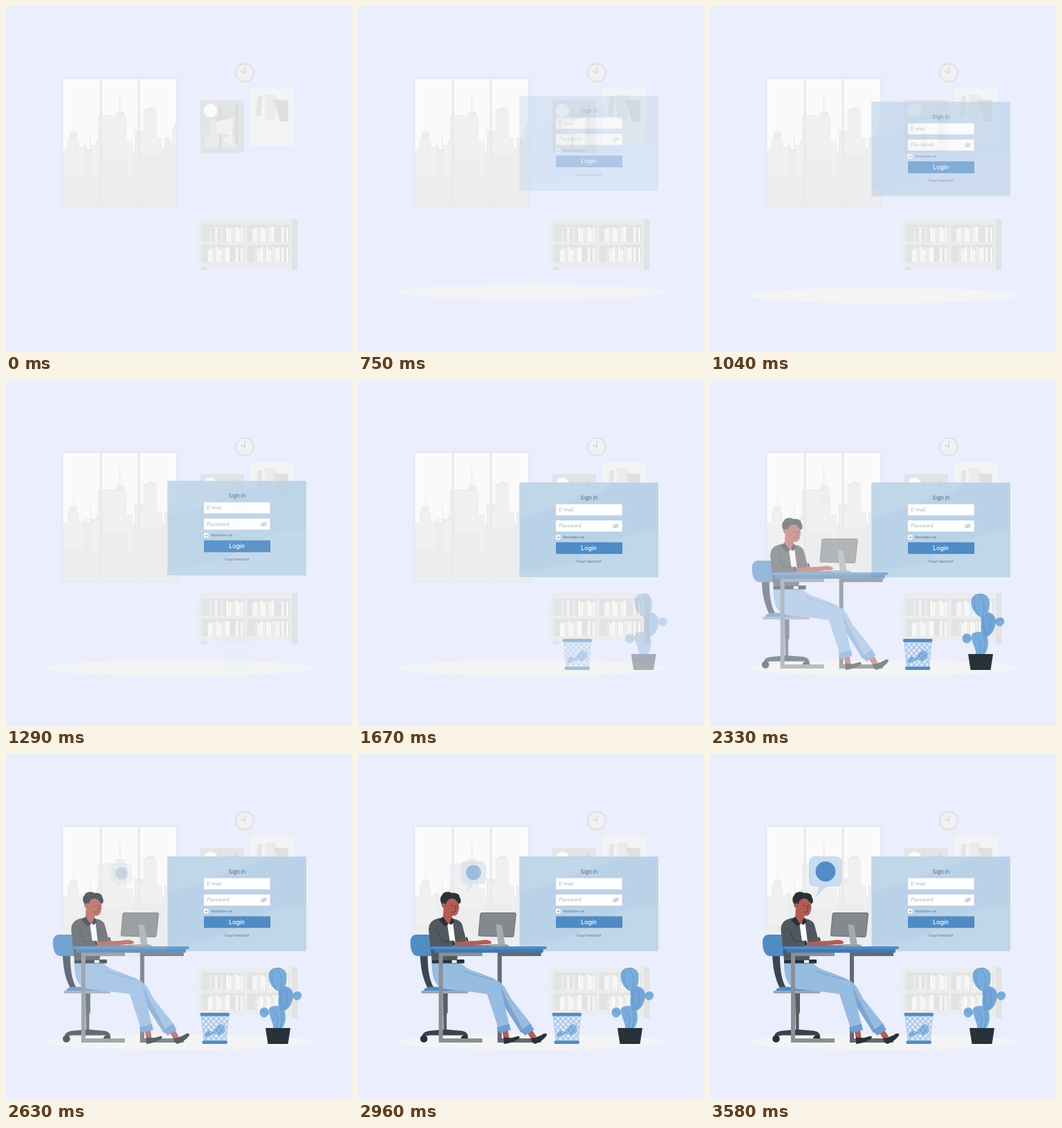
Write an HTML page that moves like this. It is 500x500 px and loops after 3.62 s.

```html
<!DOCTYPE html>
<html lang="en">
<head>
<meta charset="utf-8">
<title>Sign in</title>
<style>
html, body { margin: 0; width: 100%; height: 100%; overflow: hidden; background: #eaeefd; }
svg { display: block; width: 100%; height: 100%; }
text { font-family: Inter, "Open Sans", sans-serif; fill: #5b6d7f; }
.hint { font-size: 7px; fill: #adb1b5; }
.mid { text-anchor: middle; }
.blue { fill: #4f8cc6; }
.dark { fill: #263238; }
.skin { fill: #b55b52; }
.pad { fill: #7aacdb; stroke: #5f9ad1; stroke-width: .5; }
.vein { fill: none; stroke: #4f8cc6; stroke-width: .6; }
</style>
</head>
<body>
<svg viewBox="0 0 500 500">
  <defs>
    <pattern id="lights" width="3" height="3" patternUnits="userSpaceOnUse">
      <rect width="1.6" height="1.6" fill="#f8f8f8"/>
    </pattern>
    <pattern id="mesh" width="7.6" height="8.4" patternUnits="userSpaceOnUse">
      <path d="M0 0L7.6 8.4M7.6 0L0 8.4" stroke="#98bee4" stroke-width="1.4"/>
    </pattern>
    <clipPath id="card"><rect x="233.5" y="148.3" width="200.5" height="136.7"/></clipPath>
  </defs>

  <!-- wall outlines -->
  <g fill="none" stroke="#e9ebf6" stroke-width=".6">
    <rect x="37.500" y="55" width="205" height="283" rx="5"/>
    <rect x="254" y="55" width="205" height="283" rx="5"/>
    <path d="M0 381.500H500"/>
  </g>

  <!-- window -->
  <path d="M79.5 102.5H249V293H79.5Z" fill="#e8eaee"/>
  <path d="M82.5 105.5H246V289.5H82.5Z" fill="#fafafa"/>
  <path fill="#ededed" d="M82.5 289.5V206H89V190H92V182H97L98 169L99 182H103V192H105V204H112V200H115V206L117 196V206H121V184H122.5V201H130V195H133V158H159V152H163.5L164.2 122H165L165.8 152H171V158H174V195H183V208H186V181H183V179.5H199V150H203V147H216V152H218V190H225V206H229V190H237L240 200V178H243V170L246 167V289.5Z"/>
  <path fill="url(#lights)" d="M84 207H112V245H84ZM91 193H103V207H91ZM135 160H173V196H135ZM141 196H183V222H141ZM124 204H135V245H124ZM175 196H184V245H175ZM201 153H217V190H201ZM188 190H224V214H188ZM241 180H246V206H241Z"/>
  <path d="M137.2 104V291M192 104V291" stroke="#e8eaee" stroke-width="3.2"/>

  <!-- clock -->
  <circle cx="345" cy="96.5" r="12.9" fill="#f1f1f1" stroke="#e0e1e2" stroke-width="2.2"/>
  <path d="M345 88V97L339 93.5" fill="none" stroke="#d8d9da" stroke-width="1.7"/>

  <!-- posters -->
  <path d="M281 136H344V212H281Z" fill="#e3e4e6"/>
  <path d="M295 167L305 164L303 186L293 184ZM287 186H308V205H287ZM312 205V187L334 190V205Z" fill="#e9eaeb"/>
  <path d="M308 146H311.5V206H308ZM304 161L325 158L322 163L304 166ZM331 142H336V200H331Z" fill="#dcddde"/>
  <path d="M304 167L329 161L327 187L304 184ZM314 193L327 185V203Z" fill="#f1f1f1"/>
  <circle cx="295.5" cy="151" r="10" fill="#fafafa"/>
  <path d="M353 119H416V202H353Z" fill="#f4f4f5"/>
  <path d="M363.5 131L370.5 130L368 160L361 159Z" fill="#e5e5e6"/>
  <path d="M374 128H390V164H374Z" fill="#ebebec"/>
  <path d="M387 135L408 136V167H396Z" fill="#e0e0e0"/>

  <!-- bookcase -->
  <path d="M278 308H414V377H278Z" fill="#ececed"/>
  <path d="M413 308H421.5V382H413ZM282 377H291V382H282Z" fill="#e2e3e4"/>
  <path d="M282.5 316H410V371H282.5Z" fill="#e2e3e4"/>
  <g id="books"></g>
  <path d="M282 340.5H411V345.5H282ZM343.5 315H348.5V372H343.5ZM278 370H413V377H278Z" fill="#ececed"/>

  <ellipse id="floor" cx="250.5" cy="416.3" rx="194" ry="11.4" fill="#f4f4f4"/>

  <!-- sign-in card -->
  <g id="panel">
    <g clip-path="url(#card)">
      <path d="M233 148H435V286H233Z" fill="#bad2e7"/>
      <path d="M233 148H367C356 163 340 167 320 171S275 194 233 198Z" fill="#c0d6e9"/>
      <path d="M435 219C395 217 375 229 350 242S322 260 295 267S255 275 233 276V286H435Z" fill="#c0d6e9"/>
    </g>
    <text class="mid" x="333.8" y="172.8" font-size="7.8">Sign in</text>
    <path d="M286 179.5H381.5V195.5H286ZM286 203H381.5V219H286ZM286 224H292.5V230.5H286Z" fill="#fff"/>
    <text class="hint" x="290.3" y="190">E-mail</text>
    <text class="hint" x="290.3" y="213.4">Password</text>
    <g fill="none" stroke="#9aa2a8" stroke-width=".65">
      <path d="M368 211Q372.5 206 377 211Q372.5 216 368 211ZM368.5 214.3L376.5 207.700"/>
      <circle cx="372.5" cy="211" r="1.5"/>
    </g>
    <path d="M287.8 227.2L289 228.4L291 226.1" fill="none" stroke="#263238" stroke-width=".8"/>
    <text x="296.5" y="228.9" font-size="4.5">Remember me</text>
    <path d="M286.5 235H382V251.3H286.5Z" fill="#4279b0"/>
    <path class="blue" d="M286 234.500H381.5V250.700H286Z"/>
    <text class="mid" x="333.7" y="245.500" font-size="8.6" font-weight="500" style="fill:#fff">Login</text>
    <text class="mid" x="333.8" y="264" font-size="4.3">Forgot Password?</text>
  </g>

  <g id="basket">
    <path d="M282.5 378H321.5L318 415H286Z" fill="#e3ecf9"/>
    <path d="M287 404L293 399L299 402L304 394L310 390L316 394V402L309 407L301 404L294 408L288 409Z" fill="#74a6d8"/>
    <path d="M282.5 378H321.5L318 415H286Z" fill="url(#mesh)" stroke="#98bee4" stroke-width=".8"/>
    <rect class="blue" x="280.5" y="374" width="42.5" height="4.8" rx="2"/>
    <rect class="blue" x="283.5" y="414.3" width="36.5" height="4.8" rx="2"/>
  </g>

  <g id="plant">
    <path class="pad" d="M381 367C386 363 400 362 402.500 372S403 391 398 397H386.500C387.500 388 378 376 381 367Z"/>
    <path class="pad" d="M378.500 377C374 383 367 380 367 373.500S372 365.500 376 367.500S381.500 372 378.500 377Z"/>
    <path class="pad" d="M414.500 349C414.500 344.500 422 341.500 425.500 345S425.500 355.500 421 355.500S415.500 353 414.500 349Z"/>
    <path class="pad" d="M397 337C405 334 413.500 338 414.500 347S409 369.500 402 370.500S393 362 394 353S391.500 341 397 337Z" style="fill:#70a5d7"/>
    <path class="pad" d="M381 314.500C386 307 399.500 307.500 403.500 314.500S404.500 341.500 396 342.500S376 327 381 314.500Z"/>
    <path class="vein" d="M390 309Q403 322 396 342M385 313Q381 328 391 340M400 338Q414 350 402 369M397 345Q396 358 401 368M384 367Q396 378 391 396M396 366Q403 380 396 396M369 371Q377 371 378 377M424 345Q417 347 415 351"/>
    <path class="dark" d="M375 396H411L407.5 419H378.5Z"/>
  </g>

  <g id="work">
    <!-- chair -->
    <path d="M90 290H101C101 310 103 326 110 338H101C94 325 91 310 90 290Z" fill="#3a464d"/>
    <path class="blue" d="M84 261H114V292H86C78 291 76 281 76 272Q76 262 84 261Z"/>
    <path d="M123 345H130V373L128.5 376V400H124Z" fill="#555e64"/>
    <path d="M92.5 409Q93 401 104 400L126 398L150 400Q159 401 159.5 409Q156 406 150 406.5H104Q98 407 92.5 409Z" fill="#37434a"/>
    <circle class="dark" cx="95.5" cy="411.5" r="5.3"/>
    <path class="dark" d="M149 411A5.3 5.3 0 0 1 159.5 411Z"/>
    <path class="blue" d="M95 342Q97 336 108 336.5H150V342Z"/>
    <path d="M92 342H159V346H92Z" fill="#a3a7aa"/>

    <path d="M202 287H265V292H208V411H265V417H202Z" fill="#626a6f"/>

    <!-- worker -->
    <path class="skin" d="M209 401L217 399L219 412H211ZM245 403L252 399L258 408L251 413Z"/>
    <path class="dark" d="M211 409Q220 412 232 407.5Q236 409 232 412Q222 418 211 419ZM250 411Q262 409 269 404Q274 402.5 273 407Q266 416 256 419Q251 417 250 411Z"/>
    <path d="M178 322L203 328C212 333 216 344 221 353L252 392L239 402L204 346Z" fill="#97bce1"/>
    <path d="M203 329C209 340 212 350 218 360L240 401L236 403L209 360Z" fill="#7ba4cf"/>
    <path d="M107 302H149C156 310 163 312 175 316L198 325C206 330 208 342 210 353L219 392L204 399L187 347C165 343 150 343 128 340C111 337 107 322 107 302Z" fill="#97bce1"/>
    <path d="M153 314Q175 322 196 326" fill="none" stroke="#6d9ac8" stroke-width=".9"/>
    <path d="M201 395L219 390L221 399L204 403ZM235 400L249 390L255 398L242 407Z" fill="#6da0d4"/>
    <path class="dark" d="M107 297H154V302.5H107Z"/>
    <path d="M136 297.5H143V302H136Z" fill="#f4f4f4"/>
    <path d="M119 237C106 239 102 246 102.5 255L107 298H143L148 278H159L151 247Q149 240 138 238Z" fill="#50585d"/>
    <path d="M129 243L137 240L141 272V278H134Z" fill="#fff"/>
    <path class="skin" d="M124 222H137L136 239L131 246L123 238Z"/>
    <path class="dark" d="M123 235L131 246L126 249L117 240ZM136 236L140 242L135 247L132 245Z"/>
    <path class="skin" d="M124 210Q134 203 145 210L146.5 222Q145 235 138 234Q128 233 125 223Q121 222 121 217Z"/>
    <path class="dark" d="M122 217C118 213 119 206 122 204C123 199 132 198 136 201C142 200 148 203 147 207C150 210 149 215 147 216.5C144 216 143 210 138 209C133 208 129 211 127.5 217Q125 214 122 217Z"/>
    <path d="M134 220Q136 218 138 219.5M142 218.5L145 219M140 219L142.5 224H139.5M135 228Q138 230 142 227" fill="none" stroke="#263238" stroke-width=".7"/>
    <path class="skin" d="M138 272L158 270.5L172 270L184 268.5Q193 269 193.5 273Q190 276 182 275L165 277H138Z"/>
    <path d="M114 250Q118 265 121 272L139 270V278H118Q109 276 107 264Z" fill="#50585d"/>
    <path d="M115 254Q118 266 122 271L137 270" fill="none" stroke="#263238" stroke-width=".7"/>
    <path class="dark" d="M137 270L139.5 269.8L140 278H137ZM156 265L158 264.5L160 270L157.5 270.5Z"/>

    <!-- desk and screen -->
    <path d="M117 287H180V292H123V411H180V417H117Z" fill="#8a9195"/>
    <path d="M179 229H227Q229.5 229.5 229 232L226 262Q225.5 265 223 265L176 263.5Q173.5 263 174 260L176.5 231.5Q177 229 179 229Z" fill="#70777b"/>
    <path d="M179 230H227.5L225 263.500L175 262.300L177.500 231.500Z" fill="#83898d"/>
    <path d="M199.5 246L208 247L213 276H203Z" fill="#a5abaf"/>
    <path d="M186 278Q188 275 195 275H213Q218 275 219 278Z" fill="#9aa1a5"/>
    <path d="M136 276.3H190V278H136Z" fill="#707a80"/>
    <rect x="110" y="281" width="158" height="6.3" rx="1.5" fill="#3f79b4"/>
    <rect class="blue" x="105" y="278" width="168" height="3.9" rx="1.9"/>
  </g>

  <g id="bubble">
    <path d="M151.5 148.5H182Q190 148.5 190 156.5V183Q190 191 182 191H168L154 205L158.5 191H151.5Q143.5 191 143.5 183V156.5Q143.5 148.5 151.5 148.5Z" fill="#cadcf0" stroke="#b4cde9" stroke-width=".8"/>
    <circle class="blue" cx="167" cy="169.7" r="14.5"/>
  </g>
</svg>
<script>
const LOOP = 3620, SPAN = 1260;
const $ = id => document.getElementById(id);
const clamp = v => Math.min(1, Math.max(0, v));
const ramp = (t, start, span = SPAN) => clamp((t - start) / span);

// cubic-bezier(.36, -.01, .5, 1.38): settles after a small overshoot
const curve = (u, a, b) => 3 * a * u * (1 - u) ** 2 + 3 * b * u * u * (1 - u) + u ** 3;
function spring(x) {
  if (x <= 0 || x >= 1) return clamp(x);
  let lo = 0, hi = 1;
  for (let i = 0; i < 24; i++) {
    const u = (lo + hi) / 2;
    if (curve(u, .36, .5) < x) lo = u; else hi = u;
  }
  return curve(lo, -.01, 1.38);
}

function place(id, opacity, transform) {
  $(id).setAttribute('opacity', clamp(opacity));
  $(id).setAttribute('transform', transform);
}

// each bay: left edge, shelf line, start of the bright run
function fillShelves() {
  let out = '';
  const book = (x, base, w, h, c) =>
    out += `<rect x="${x}" y="${base - h}" width="${w}" height="${h}" fill="${c}"/>`;
  for (const [x, base, run] of [[283, 341, 36], [349, 341, 7], [283, 370.5, 9], [349, 370.5, 15]]) {
    for (let i = 0; i < 4; i++) book(x + 11 + i * 8, base, 3.4, 22, i % 2 ? '#f6f6f6' : '#ebebec');
    for (let i = 0, p = run; p < Math.min(run + 28, 59); i++) {
      const w = 2.5 + (i * 7 % 3);
      book(x + p, base, w, 19 + (i * 5 % 4), i % 3 == 2 ? '#ebebec' : '#f8f8f8');
      p += w + .6;
    }
    book(x + 49, base, 3.5, 22, '#f6f6f6');
    book(x + 56, base, 3, 21, '#f6f6f6');
  }
  $('books').innerHTML = out;
}

function draw(now) {
  const t = now % LOOP;

  const floor = spring(ramp(t, 0));
  place('floor', floor, `translate(0 ${30 * (floor - 1)})`);

  const panel = ramp(t, 350, 1032);
  place('panel', panel, `translate(0 ${30 * (panel - 1)})`);

  for (const [id, start] of [['basket', 1190], ['plant', 1280]]) {
    const p = spring(ramp(t, start));
    place(id, p, `translate(${30 * (1 - p)} 0)`);
  }

  const work = ramp(t, 1715);
  place('work', work ** .85, `translate(${30 * (work - 1)} 0)`);

  const bubble = ramp(t, 2290, 1310);
  place('bubble', bubble, `translate(167 176.5) scale(${.5 + bubble / 2}) translate(-167 -176.5)`);
}

function tick() {
  draw(performance.now());
  requestAnimationFrame(tick);
}

fillShelves();
tick();
</script>
</body>
</html>
```
